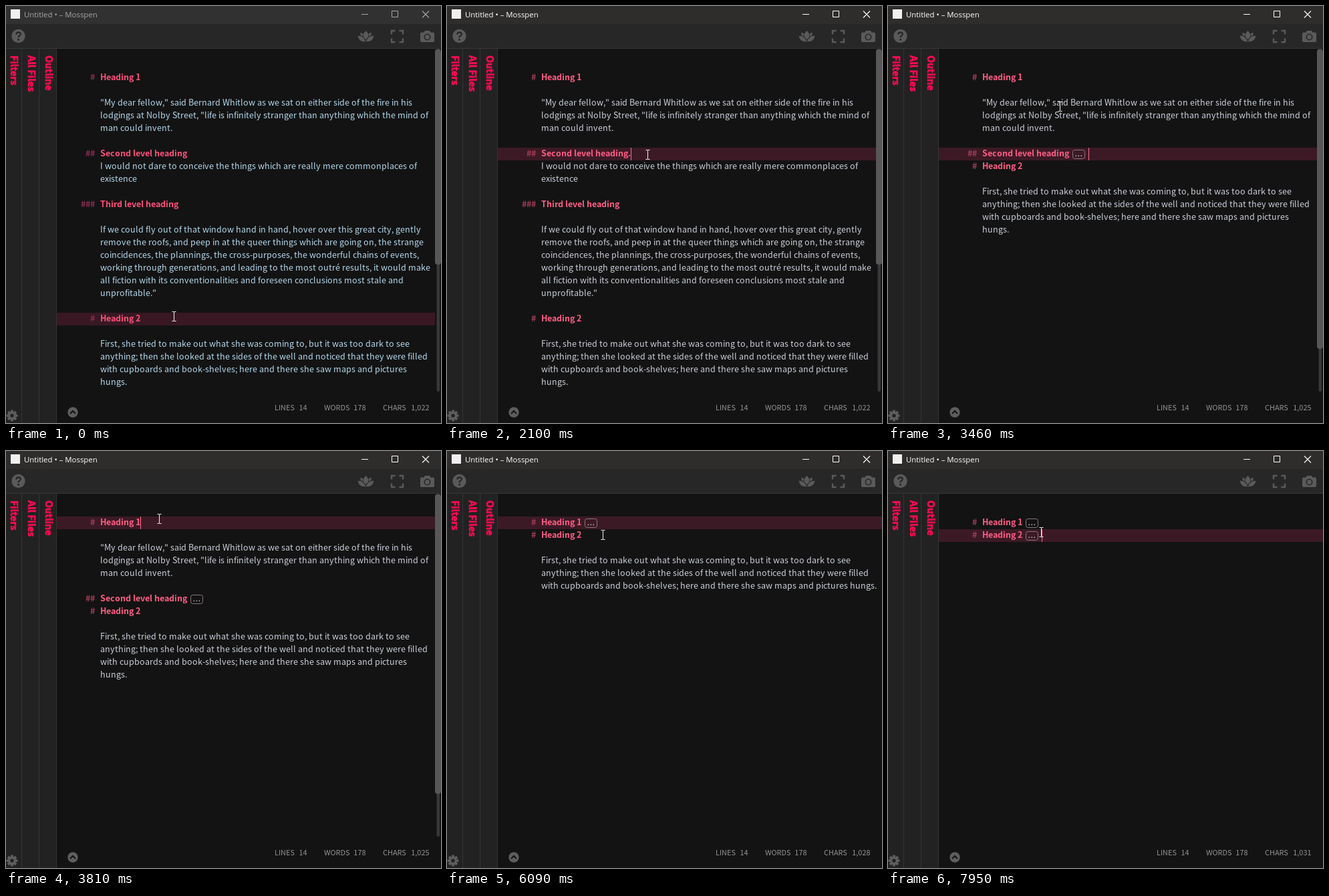
These frames come from a looping animation (651x624 px, 8 s). An HTML page with a canvas:

```html
<!DOCTYPE html>
<html lang="en">
<head>
<meta charset="utf-8">
<title>Folding headings</title>
<style>
  html, body { margin: 0; width: 100%; height: 100%; overflow: hidden; background: #131313; }
  canvas { display: block; }
</style>
</head>
<body>
<canvas id="stage" width="651" height="624"></canvas>
<script>
const ctx = document.getElementById('stage').getContext('2d');
const LOOP = 8000, LEFT = 141, TOP = 98, ROW = 19;
const SANS = '"Noto Sans CJK JP", "Noto Sans CJK SC", "Noto Sans CJK", sans-serif';
const BODY = '12.53px ' + SANS;
const HEAD = 'bold 12.5px ' + SANS;
const SIDE = 'bold 14.3px ' + SANS;
const STATUS = '10.9px ' + SANS;
const TITLE = '11.4px "Open Sans", "Noto Sans", sans-serif';

const EARLY = { text: '#b4d8ec', head: '#ff4f7a', hash: '#8c2d54', band: '#391823' };
const LATE = { text: '#cbcfd9', head: '#ff5d84', hash: '#a33e5a', band: '#3c1a25' };

const INTRO = [
  '"My dear fellow," said Bernard Whitlow as we sat on either side of the fire in his',
  'lodgings at Nolby Street, "life is infinitely stranger than anything which the mind of',
  'man could invent.'
];
const SECOND = [
  'I would not dare to conceive the things which are really mere commonplaces of',
  'existence'
];
const THIRD = [
  'If we could fly out of that window hand in hand, hover over this great city, gently',
  'remove the roofs, and peep in at the queer things which are going on, the strange',
  'coincidences, the plannings, the cross-purposes, the wonderful chains of events,',
  'working through generations, and leading to the most outré results, it would make',
  'all fiction with its conventionalities and foreseen conclusions most stale and',
  'unprofitable."'
];
const LAST = [
  'First, she tried to make out what she was coming to, but it was too dark to see',
  'anything; then she looked at the sides of the well and noticed that they were filled',
  'with cupboards and book-shelves; here and there she saw maps and pictures',
  'hungs.'
];
const LAST_WIDE = [LAST[0], LAST[1], LAST[2] + ' ' + LAST[3]];

// Pointer moves: start, last step, x, y
const MOVES = [
  [190, 190, 266, 461], [750, 950, 303, 300], [1000, 1150, 311, 217],
  [1550, 1550, 290, 219], [1600, 1600, 285, 221], [1700, 1750, 301, 222],
  [3110, 3210, 300, 231], [3260, 3460, 258, 150], [3510, 3610, 228, 100],
  [3810, 3810, 230, 101], [3910, 3960, 234, 107],
  [5840, 6090, 234, 125], [6140, 6290, 236, 124], [7900, 7950, 230, 121]
];

const count = (t, times) => times.filter(at => t >= at).length;
const between = (t, a, b) => t >= a && t < b;

function box(x, y, w, h, color) {
  ctx.fillStyle = color;
  ctx.fillRect(x, y, w, h);
}

function round(x, y, w, h, r, color) {
  ctx.beginPath();
  ctx.roundRect(x, y, w, h, r);
  ctx.fillStyle = color;
  ctx.fill();
}

function disc(x, y, r, color) {
  ctx.beginPath();
  ctx.arc(x, y, r, 0, Math.PI * 2);
  ctx.fillStyle = color;
  ctx.fill();
}

function line(path, color, width) {
  ctx.strokeStyle = color;
  ctx.lineWidth = width;
  ctx.stroke(new Path2D(path));
}

function text(str, x, y, font, color, align = 'left') {
  ctx.font = font;
  ctx.fillStyle = color;
  ctx.textAlign = align;
  ctx.fillText(str, x, y);
}

// Glyph advance rounded to whole pixels, as in hinted screen text
const advances = new Map();
function advance(ch, font) {
  const key = font + ch;
  if (!advances.has(key)) {
    ctx.font = font;
    advances.set(key, Math.round(ctx.measureText(ch).width));
  }
  return advances.get(key);
}

// Draws on the pixel grid and returns the end of the text
function gridText(str, x, y, font, color) {
  ctx.font = font;
  ctx.fillStyle = color;
  ctx.textAlign = 'left';
  for (const ch of str) {
    ctx.fillText(ch, x, y);
    x += advance(ch, font);
  }
  return x;
}

function drawTitle(active) {
  const color = active ? '#ffffff' : '#a6a6a6';
  box(0, 0, 651, 27, active ? '#2f2d2c' : '#313131');
  box(7, 5, 14, 14, '#f0f0f0');
  text('Untitled • – Mosspen', 27, 17, TITLE, color);
  line('M532 12.5H542M577.5 7.5H586.5V16.5H577.5Z', color, 1);
  line('M623 7.5L633 17.5M633 7.5L623 17.5', color, 1.1);
}

function drawToolbar() {
  const bar = '#272727', icon = '#5a5a5a';
  box(0, 27, 651, 36, bar);
  box(0, 63, 651, 1, '#363636');

  disc(18.5, 45, 10.2, icon);
  line('M15.3 42.6Q15.5 39.3 18.6 39.3Q22 39.4 21.8 42.2Q21.6 44 19.8 44.8Q18.6 45.5 18.6 47.2', bar, 2.3);
  disc(18.6, 50.2, 1.5, bar);

  // Lotus, one half mirrored onto the other
  ctx.fillStyle = icon;
  ctx.fill(new Path2D('M538.5 37Q544 42 542 46.6Q539.5 48.6 538.5 51Q537.5 48.6 535 46.6Q533 42 538.5 37Z'));
  const half = new Path2D('M526.5 44.5Q535.5 44.5 538.3 53.2Q528 54.3 526.5 44.5Z' +
    'M530.3 39.8Q533 40.3 534.3 41.6Q533.3 44 533.9 45.7Q532.4 44.5 530.8 43.9Z');
  ctx.fill(half);
  ctx.save();
  ctx.translate(1077, 0);
  ctx.scale(-1, 1);
  ctx.fill(half);
  ctx.restore();

  line('M577 42.5V37H582.5M588.5 37H594V42.5M594 48.5V54H588.5M582.5 54H577V48.5', icon, 2.4);

  round(620, 39.5, 21, 14.5, 2, icon);
  round(626, 37, 9, 5, 1.5, icon);
  disc(630.5, 46.5, 5, bar);
  disc(630.5, 46.5, 3.4, icon);
}

function drawSidebar() {
  const pink = '#ff0a54';
  box(0, 64, 75, 560, '#222222');
  ['Filters', 'All Files', 'Outline'].forEach((label, i) => {
    box(23 + i * 26, 64, 1, 560, '#343434');
    ctx.save();
    ctx.translate(6.5 + i * 26, 74);
    ctx.rotate(Math.PI / 2);
    text(label, 0, 0, SIDE, pink);
    ctx.strokeStyle = pink;
    ctx.lineWidth = 0.7;
    ctx.strokeText(label, 0, 0);
    ctx.restore();
  });

  ctx.save();
  ctx.translate(9, 613);
  for (let i = 0; i < 4; i++) {
    box(-1.9, -8.4, 3.8, 16.8, '#5e5e5e');
    ctx.rotate(Math.PI / 4);
  }
  disc(0, 0, 6.2, '#5e5e5e');
  disc(0, 0, 2.7, '#222222');
  ctx.restore();
}

function drawStatus(chars) {
  const gray = '#949494';
  disc(100, 608, 7.7, '#5e5e5e');
  line('M96 610L100 606L104 610', '#131313', 2);
  text('LINES', 402, 605, STATUS, gray);
  text('14', 450.5, 605, STATUS, gray, 'right');
  text('WORDS', 476, 605, STATUS, gray);
  text('178', 538.5, 605, STATUS, gray, 'right');
  text('CHARS', 564, 605, STATUS, gray);
  text('1,' + String(chars).padStart(3, '0'), 633.5, 605, STATUS, gray, 'right');
}

function drawScrollbar(bottom) {
  round(644.5, 380, 4.5, 197, 2, '#383838');
  round(642, 64.5, 9, bottom - 64.5, 4, '#575757');
}

// Rows are strings for body text and objects for headings
function buildRows(t) {
  const folded = [t >= 5180, t >= 2600, t >= 7300];
  const heading = (id, level, label, times) => ({
    id, level, label,
    folded: folded[id],
    dots: folded[id] ? '' : '.'.repeat(count(t, times))
  });
  const rows = [heading(0, 1, 'Heading 1', [4060, 4470, 5030])];
  if (!folded[0]) {
    rows.push('', ...INTRO, '', heading(1, 2, 'Second level heading', [2100, 2150, 2350]));
    if (!folded[1]) {
      rows.push(...SECOND, '', { id: 3, level: 3, label: 'Third level heading', dots: '' }, '', ...THIRD, '');
    }
  }
  rows.push(heading(2, 1, 'Heading 2', [6750, 6850, 7100]));
  if (!folded[2]) rows.push('', ...(t >= 5230 ? LAST_WIDE : LAST));
  return rows;
}

function drawBadge(x, y) {
  ctx.beginPath();
  ctx.roundRect(x + 0.5, y + 3.5, 18, 13, 3);
  ctx.strokeStyle = '#85787d';
  ctx.lineWidth = 1;
  ctx.stroke();
  for (let i = 0; i < 3; i++) box(x + 4.5 + i * 4, y + 11.5, 1.6, 1.6, '#b0aeb2');
}

function drawHeading(row, y, colors, caret) {
  const hashX = 133 - row.level * advance('#', HEAD);
  gridText('#'.repeat(row.level), hashX, y + 13, HEAD, colors.hash);
  let end = gridText(row.label + row.dots, LEFT, y + 13, HEAD, colors.head);
  if (row.folded) {
    drawBadge(end + 5, y);
    end += 29;
  }
  if (caret) box(end, y, 1, ROW, '#ff6a8c');
}

function drawEditor(t) {
  const colors = t < 2100 ? EARLY : LATE;
  const active = t < 1650 ? 2 : t < 3810 ? 1 : t < 6190 ? 0 : 2;
  const caret = t >= 1650 && !between(t, 5480, 6190);
  const right = t < 5230 ? 642 : 651;
  buildRows(t).forEach((row, i) => {
    const y = TOP + i * ROW;
    if (typeof row === 'string') {
      gridText(row, LEFT, y + 13, BODY, colors.text);
      return;
    }
    const on = row.id === active;
    if (on) box(76, y, right - 76, ROW, colors.band);
    drawHeading(row, y, colors, on && caret);
  });
}

function pointerAt(t) {
  let x = 252, y = 464;
  for (const [from, to, nx, ny] of MOVES) {
    if (t < from) break;
    const step = Math.floor((t - from) / 50) + 1;
    const p = Math.min(1, step / ((to - from) / 50 + 1));
    x += (nx - x) * p;
    y += (ny - y) * p;
  }
  return [Math.round(x), Math.round(y)];
}

function drawPointer(t) {
  if (between(t, 4060, 5480) || between(t, 6750, 7600)) return;
  const [x, y] = pointerAt(t);
  ctx.save();
  ctx.translate(x - 0.5, y);
  line('M-3 -6.5h2.5l.5 .5l.5 -.5h2.5M0 -6v13M-3 7.5h2.5l.5 -.5l.5 .5h2.5', '#f4f4f4', 1);
  ctx.restore();
}

function charsAt(t) {
  return (t >= 2350 ? 25 : 22) + count(t, [4060, 4470, 5030, 6750, 6850, 7100]);
}

function draw(t) {
  box(0, 0, 651, 624, '#131313');
  drawTitle(t >= 1650);
  drawToolbar();
  drawSidebar();
  drawEditor(t);
  if (t < 5230) drawScrollbar(t < 2600 ? 387 : 513);
  drawStatus(charsAt(t));
  drawPointer(t);
}

function tick() {
  draw(performance.now() % LOOP);
  requestAnimationFrame(tick);
}
tick();
</script>
</body>
</html>
```
